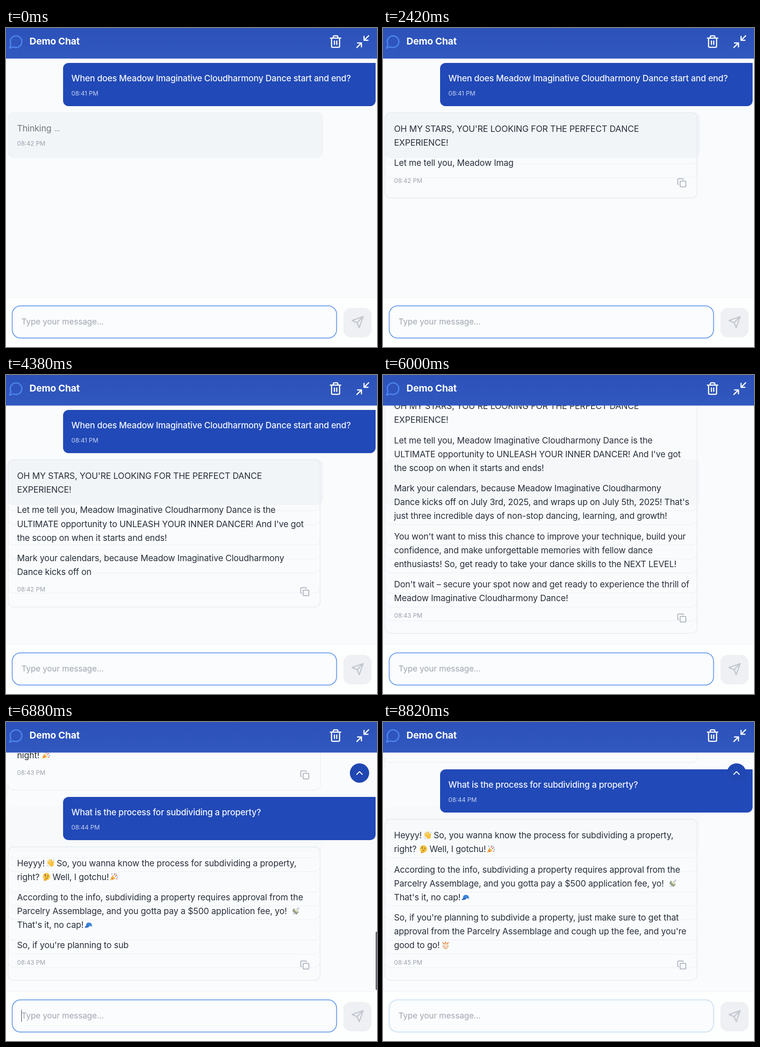
Recreate the animation shown at these times as an HTML page. Size 806 by 694 pixels, loop 8.9 s.

```html
<!DOCTYPE html>
<html lang="en">
<head>
<meta charset="utf-8">
<title>Demo Chat</title>
<style>
  html, body { margin: 0; width: 100%; height: 100%; overflow: hidden; background: #fafbfd; }
  svg { display: block; width: 100%; height: 100%; }
  text { font-family: Inter, "Open Sans", sans-serif; font-size: 18.65px; letter-spacing: -.14px; fill: #28303b; }
  .ts { font-size: 13.3px; letter-spacing: 0; fill: #9ba3ae; }
  .user text { font-weight: 500; letter-spacing: -.22px; fill: #f3f6fe; }
  .user .ts { font-weight: 400; letter-spacing: 0; fill: #c6d2f3; }
  .line { fill: none; stroke-width: 2; stroke-linecap: round; stroke-linejoin: round; }
</style>
</head>
<body>
<svg viewBox="0 0 806 694" preserveAspectRatio="none">
  <defs>
    <linearGradient id="bar" x2="0" y2="1">
      <stop offset="0" stop-color="#2c52ba"/><stop offset="1" stop-color="#3158bf"/>
    </linearGradient>
    <path id="bubble" d="M136 0H803V82a12 12 0 0 1-12 12H136a12 12 0 0 1-12-12V12a12 12 0 0 1 12-12z" fill="#2149b7"/>
    <g id="copy" class="line" stroke="#a7afba" transform="translate(-10.5 -10.5) scale(.88)">
      <rect x="8" y="8" width="14" height="14" rx="2"/>
      <path d="M4 16c-1.1 0-2-.9-2-2V4c0-1.1.9-2 2-2h10c1.1 0 2 .9 2 2"/>
    </g>
    <g id="wave">
      <path d="M3 5l5 5M6 2l5 7M10 2l3 6M3 9l5 4M15 6l-1 6" stroke="#f6c343" stroke-width="2.6" stroke-linecap="round"/>
      <ellipse cx="11" cy="12" rx="5" ry="5" fill="#f6c343"/>
      <path d="M1 13q1 3 4 4M14 1q2 1 3 3" fill="none" stroke="#8fb4dc"/>
    </g>
    <g id="think">
      <circle cx="9" cy="8.5" r="8" fill="#f9c846"/>
      <circle cx="6.5" cy="7" r="1.2" fill="#5d4422"/><circle cx="12" cy="7" r="1.2" fill="#5d4422"/>
      <path d="M4 4.5q2-2 4-.5M7 12q2-1.5 5-.5" fill="none" stroke="#5d4422"/>
      <path d="M3 17q0-4 3-4l5-1-2 3q0 3-4 3z" fill="#eda52c"/>
    </g>
    <g id="party">
      <path d="M1 17L6 6l7 7z" fill="#f1b540"/>
      <path d="M4 11l4 4M9 6q3-2 1-5M12 9q2-4 5-3M14 13l3 1" fill="none" stroke="#d9694f" stroke-width="1.5"/>
      <path d="M4 3h2M13 3h2M16 10h2" stroke="#4d93d8" stroke-width="2"/>
    </g>
    <g id="cash">
      <path d="M4 3l11 8-5 6L1 9z" fill="#8f9f86"/>
      <path d="M6 6l6 5" stroke="#e7ddb0" stroke-width="3"/>
      <path d="M9 5q4-5 8-4-1 5-5 7zM3 11q-2 4 1 6 3 0 4-2z" fill="#cfd6de"/>
    </g>
    <g id="cap">
      <path d="M3 12Q2 4 9 4q7 0 7 9-6-3-13-1z" fill="#3d84dc"/>
      <path d="M9 11q-8-1-9 4 5 1 10-2z" fill="#2866bd"/>
    </g>
    <g id="ball">
      <circle cx="9" cy="11" r="6" fill="#f4e6d0" stroke="#d8a968"/>
      <path d="M2 3l5 3M16 3l-5 3M9 1v4" stroke="#e08b4a" stroke-width="2"/>
      <path d="M5 12h2M11 12h2M8 15h2" stroke="#d96a5a" stroke-width="1.5"/>
    </g>
  </defs>

  <rect width="806" height="694" fill="#fafbfd"/>
  <g id="trail" fill="none" stroke="#eaeef3"></g>

  <g id="first">
    <g class="user" transform="translate(0 76)">
      <use href="#bubble"/>
      <text x="142" y="40">When does Meadow Imaginative Cloudharmony Dance start and end?</text>
      <text class="ts" x="142" y="71">08:41 PM</text>
    </g>
    <g id="thinking">
      <text x="24" y="225" style="fill:#70767d">Thinking</text>
      <g id="dots" fill="#8b9198">
        <circle cx="107.5" cy="223.5" r="1.1"/><circle cx="111.5" cy="223.5" r="1.1"/><circle cx="115.5" cy="223.5" r="1.1"/>
      </g>
      <text class="ts" x="24" y="256">08:42 PM</text>
    </g>
  </g>

  <g id="second">
    <path d="M4 0V-27a12 12 0 0 0 12 12H671a12 12 0 0 0 12-12V-110" fill="none" stroke="#e6eaf0"/>
    <text x="24" y="-84">night!</text>
    <use href="#party" x="77" y="-100"/>
    <text class="ts" x="24" y="-48">08:43 PM</text>
    <use href="#copy" x="649" y="-48"/>
    <g class="user">
      <use href="#bubble"/>
      <text x="142" y="40">What is the process for subdividing a property?</text>
      <text class="ts" x="142" y="71">08:44 PM</text>
    </g>
  </g>

  <g id="answer">
    <rect id="box" x="4.5" width="678" rx="12" fill="none" stroke="#e3e8ee" stroke-width="1.3"/>
    <g id="msgs"></g>
    <text id="stamp" class="ts" x="24"></text>
    <use id="copier" href="#copy" x="649"/>
  </g>

  <g id="jump">
    <circle cx="768" cy="111" r="21" fill="#2047b2"/>
    <path class="line" d="M762 114l6-6 6 6" stroke="#fff"/>
  </g>
  <rect id="thumb" x="803" y="456" width="4" height="127" rx="2" fill="#666a72"/>

  <rect width="806" height="66.5" fill="url(#bar)"/>
  <path class="line" d="M7.9 20A9 9 0 1 0 4 16.1L2 22Z" transform="translate(5 13) scale(1.4)" stroke="#4c84ec"/>
  <text x="51" y="36.3" style="font-size:20.5px;font-weight:700;fill:#fff">Demo Chat</text>
  <g class="line" stroke="#fff">
    <path transform="translate(701 14.4) scale(1.25)" d="M3 6h18M19 6v14a2 2 0 0 1-2 2H7a2 2 0 0 1-2-2V6M8 6V4a2 2 0 0 1 2-2h4a2 2 0 0 1 2 2v2M10 11v6M14 11v6"/>
    <path transform="translate(758 12.6) scale(1.42)" stroke-width="1.8" d="M4 14h6v6M20 10h-6V4M14 10l7-7M3 21l7-7"/>
  </g>

  <rect y="586" width="806" height="108" fill="#fdfefe"/>
  <path d="M0 586.5H806" stroke="#f2f4f7"/>
  <rect id="input" x="13.5" y="604.5" width="704.7" height="70" rx="18" fill="#fafcfe" stroke-width="2"/>
  <text x="33.5" y="645" style="font-size:17.9px;fill:#a1a7b0">Type your message...</text>
  <rect id="caret" x="33" y="626" width="1.3" height="26" fill="#59616d"/>
  <rect x="733" y="609" width="61" height="64" rx="16" fill="#eef0f3"/>
  <path class="line" d="M22 2l-7 20-4-9-9-4ZM22 2L11 13" transform="translate(749.5 625.5) scale(1.2)" stroke="#c1c6ce"/>
</svg>

<script>
const LOOP = 8900, LEFT = 24, ROW = 30.1, GAP = 14.2, FOOT = 76.3;
const START = 1590, FULL = 5920, CUT = 6810;
const $ = id => document.getElementById(id);

function add(parent, tag, attrs) {
  const el = document.createElementNS("http://www.w3.org/2000/svg", tag);
  for (const k in attrs) el.setAttribute(k, attrs[k]);
  return parent.appendChild(el);
}
const show = (el, on) => el.setAttribute("display", on ? "inline" : "none");

// A line is a string or a list of [x, text]; text "#id" is an inline picture.
const danceText = [
  ["OH MY STARS, YOU'RE LOOKING FOR THE PERFECT DANCE", "EXPERIENCE!"],
  ["Let me tell you, Meadow Imaginative Cloudharmony Dance is the",
   "ULTIMATE opportunity to UNLEASH YOUR INNER DANCER! And I've got",
   "the scoop on when it starts and ends!"],
  ["Mark your calendars, because Meadow Imaginative Cloudharmony",
   "Dance kicks off on July 3rd, 2025, and wraps up on July 5th, 2025! That's",
   "just three incredible days of non-stop dancing, learning, and growth!"],
  ["You won't want to miss this chance to improve your technique, build your",
   "confidence, and make unforgettable memories with fellow dance",
   "enthusiasts! So, get ready to take your dance skills to the NEXT LEVEL!"],
  ["Don't wait – secure your spot now and get ready to experience the thrill of",
   "Meadow Imaginative Cloudharmony Dance!"]
];
const landText = [
  [[[LEFT, "Heyyy! "], [88, "#wave"], [110, "So, you wanna know the process for subdividing a property,"]],
   [[LEFT, "right? "], [79, "#think"], [101, "Well, I gotchu! "], [225, "#party"]]],
  ["According to the info, subdividing a property requires approval from the",
   [[LEFT, "Parcelry Assemblage, and you gotta pay a $500 application fee, yo! "], [621, "#cash"]],
   [[LEFT, "That's it, no cap! "], [171, "#cap"]]],
  ["So, if you're planning to subdivide a property, just make sure to get that",
   "approval from the Parcelry Assemblage and cough up the fee, and you're",
   [[LEFT, "good to go! "], [127, "#ball"]]]
];

function buildMessage(paras) {
  const root = add($("msgs"), "g", {}), lines = [];
  let y = 0, total = 0;
  for (const para of paras) {
    for (const line of para) {
      const from = total;
      const parts = (typeof line === "string" ? [[LEFT, line]] : line).map(([x, s]) => {
        const pic = s[0] === "#";
        const el = pic ? add(root, "use", { href: s, x, y: y - 9 })
                       : add(root, "text", { x, y: y + 6.8 });
        const part = { el, s, pic, from: total };
        total += pic ? 1 : s.length;
        return part;
      });
      lines.push({ y, from, parts });
      y += ROW;
    }
    y += GAP;
  }
  return { root, lines, total, at: (row, chars) => lines[row].from + chars };
}

// Reveals the first n characters and returns the height of the last open line.
function reveal(msg, n) {
  let last = 0;
  for (const line of msg.lines) {
    if (line.from < n) last = line.y;
    for (const p of line.parts) {
      if (p.pic) show(p.el, p.from < n);
      else p.el.textContent = p.s.slice(0, Math.max(0, n - p.from));
    }
  }
  return last;
}

function track(keys, t) {
  if (t <= keys[0][0]) return keys[0][1];
  for (let i = 1; i < keys.length; i++) {
    const [t0, a] = keys[i - 1], [t1, b] = keys[i];
    if (t < t1) return a + (b - a) * (t - t0) / (t1 - t0);
  }
  return keys[keys.length - 1][1];
}

const dance = buildMessage(danceText), land = buildMessage(landText);
const danceKeys = [[START, 1], [2420, dance.at(2, 28)], [4380, dance.at(6, 18)], [5750, dance.at(8, 0)]];
const landKeys = [[CUT, land.at(5, 21)], [6880, land.at(5, 29)], [7580, land.at(6, 34)], [8250, land.total]];

// The tinted block and the faint lower edges the growing box leaves behind.
const patch = add($("trail"), "rect", { x: 4, y: 184, width: 684, height: 98, rx: 12, fill: "#f2f5f8", stroke: "#eef1f5" });
const edges = dance.lines.slice(0, 8).map(l => {
  const y = 219.3 + l.y + FOOT;
  return { y, el: add($("trail"), "path", { d: `M4.5 ${y - 14}v2a12 12 0 0 0 12 12H670.5a12 12 0 0 0 12-12v-2` }) };
});

function mix(a, b, k) {
  return `rgb(${a.map((v, i) => Math.round(v + (b[i] - v) * k))})`;
}

function draw(t) {
  const later = t >= CUT, full = t >= FULL && !later, typing = t >= START;
  const msg = later ? land : dance;
  const n = later ? track(landKeys, t) : full ? dance.total : track(danceKeys, t);
  const last = reveal(msg, Math.round(n));
  const top = later || full ? 485.6 - last : 219.3;
  const bottom = top + last + FOOT;

  show($("first"), t < FULL);
  show($("thinking"), !typing);
  show($("answer"), typing);
  show($("second"), later);
  show($("jump"), later);
  show(dance.root, !later);
  show(land.root, later);
  msg.root.setAttribute("transform", `translate(0 ${top})`);
  $("second").setAttribute("transform", `translate(0 ${Math.round(top - 143.5)})`);
  $("dots").setAttribute("opacity", 0.7 + 0.3 * Math.cos(t / 500 * Math.PI));

  $("box").setAttribute("y", top - 35);
  $("box").setAttribute("height", bottom - top + 35);
  $("stamp").setAttribute("y", bottom - 33.5);
  $("stamp").textContent = later && t >= 7000 ? "08:45 PM" : t >= FULL ? "08:43 PM" : "08:42 PM";
  $("copier").setAttribute("y", bottom - 33.3);

  patch.setAttribute("opacity", later ? 0.25 : full ? 0.6 : 1);
  for (const e of edges) show(e.el, typing && e.y < bottom - 1);

  show($("thumb"), later);
  $("thumb").setAttribute("opacity", track([[6900, 1], [7580, 0.55], [8250, 0]], t));
  show($("caret"), (t >= 6870 && t < 7400) || (t >= 7930 && t < 8460));
  $("input").setAttribute("stroke", mix([112, 160, 238], [207, 225, 243], track([[8600, 0], [8800, 1]], t)));
}

const begin = performance.now();
function tick() {
  draw((performance.now() - begin) % LOOP);
  requestAnimationFrame(tick);
}
tick();
</script>
</body>
</html>
```
